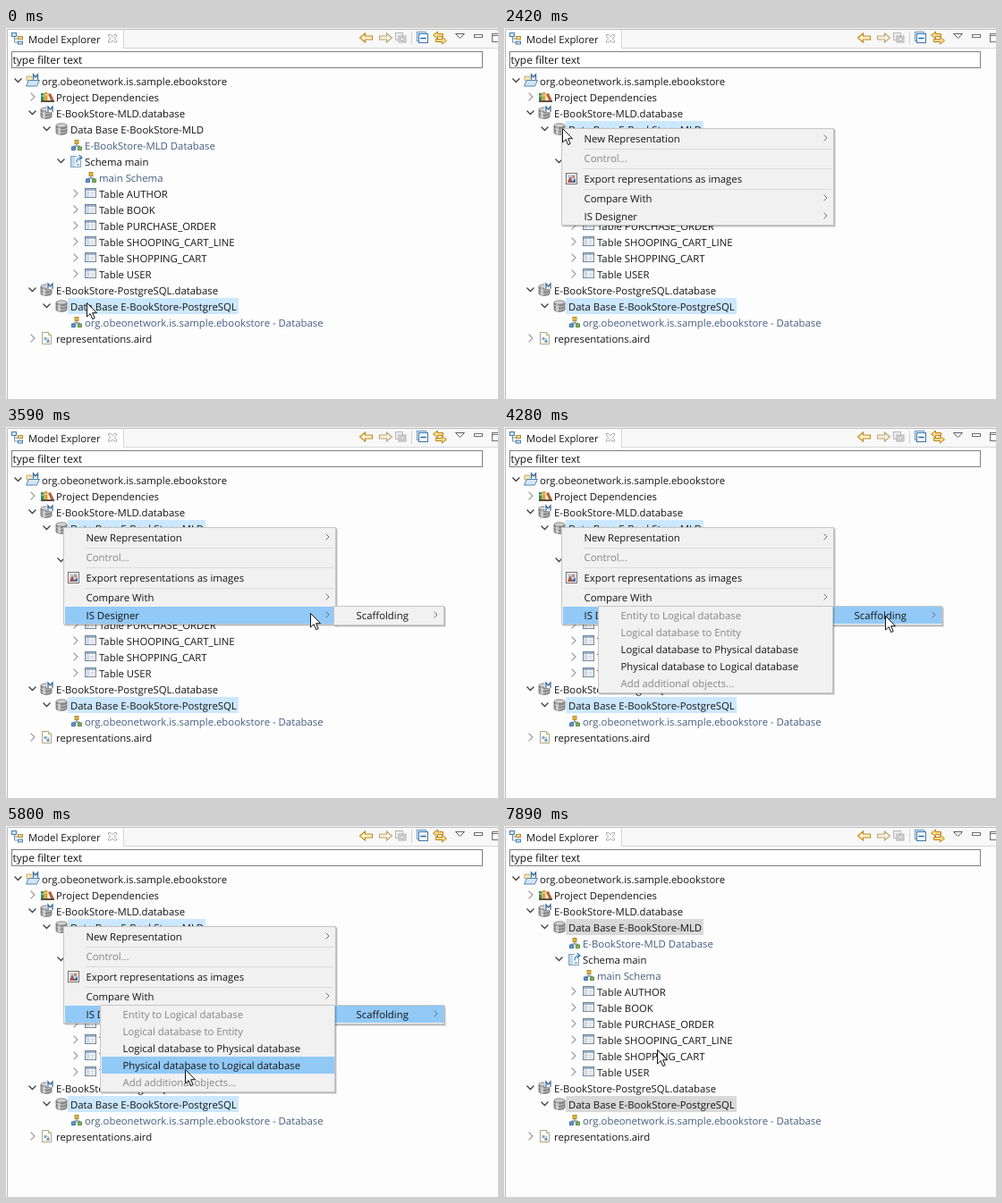
Recreate the animation shown at these times as an HTML page. Size 550 px wide and 415 px high, loop 8000 ms.

```html
<!DOCTYPE html>
<html lang="en">
<head>
<meta charset="utf-8">
<title>Model Explorer</title>
<style>
html, body { margin: 0; width: 100%; height: 100%; overflow: hidden; background: #fdfdfd; }
svg { display: block; width: 550px; height: 415px; }
text { font-family: "Open Sans", "Noto Sans", sans-serif; font-size: 11.35px; fill: #161616; text-rendering: geometricPrecision; white-space: pre; }
.line { fill: none; stroke-linecap: square; }
</style>
</head>
<body>
<svg id="stage" viewBox="0 0 550 415" xmlns="http://www.w3.org/2000/svg"></svg>
<script>
const LOOP = 8000;
const BLUE = '#cce8ff', HOVER = '#e5f3ff', GREY = '#d9d9d9', ACTIVE = '#91c9f7';
const stage = document.getElementById('stage');

const rect = (x, y, w, h, fill, more = '') => `<rect x="${x}" y="${y}" width="${w}" height="${h}" fill="${fill}" ${more}/>`;
const path = (d, fill, stroke = 'none', w = 1) => `<path d="${d}" fill="${fill}" stroke="${stroke}" stroke-width="${w}"/>`;
const label = (x, y, s, more = '') => `<text x="${x}" y="${y}" ${more}>${s}</text>`;
const group = (x, y, body, scale = '1 1') => `<g transform="translate(${x} ${y}) scale(${scale})">${body}</g>`;
const stroke = (d, color, w = 1) => `<path class="line" d="${d}" stroke="${color}" stroke-width="${w}"/>`;

// Icons: x starts at the left edge, y is centred on the row.
const badge = (x, y) => stroke(`M${x} ${y + 5}v-5l2.5 3 2.5 -3v5`, '#3a6a98', 1.3);
const drum = path('M0 -4v8c0 3 12 3 12 0v-8z', '#8a8a8a', '#6d6d6d', .8) +
  path('M2 -3v8.6c1 .4 2 .5 3 .5v-9z', '#c6c6c6') +
  '<ellipse cx="6" cy="-4" rx="6" ry="2.2" fill="#d2d2d2" stroke="#777" stroke-width=".8"/>' +
  stroke('M.5 -.5c1 2 10 2 11 0M.5 3c1 2 10 2 11 0', '#dedede', .7);
const icons = {
  folder: path('M1 -5h5l1 2h7v3h-13z', '#f7e8b8', '#b99a52', .8) +
    path('M.5 6l3 -6.5h12l-3 6.5z', '#d3e5f4', '#3f7db0', .9) +
    rect(7, -8, 8, 7, '#fdfdfd') + badge(8.5, -7),
  books: rect(0, -4, 3.5, 10, '#3b8a57') + rect(4, -5, 3.5, 11, '#e0a02c') +
    path('M8 -3l3 -1 4 9 -3 1z', '#bd5c36') + rect(0, 4, 15, 2, '#5b5040') +
    stroke('M1 -1h1.5M5 -2h1.5', '#fff', .8),
  model: drum + rect(6.5, -8, 8, 7, '#fdfdfd') + badge(8, -7),
  drum,
  diagram: stroke('M6 -1v2M2.5 3v-2h7v2', '#6d7d8e') +
    rect(4, -5.5, 4, 4, '#e6b93a', 'stroke="#a37b18" stroke-width=".8"') +
    rect(.5, 2, 4, 3.5, '#5d9bd1', 'stroke="#2d6394" stroke-width=".8"') +
    rect(7.5, 2, 4, 3.5, '#81b55a', 'stroke="#4b7f2d" stroke-width=".8"'),
  schema: rect(.5, -5.5, 11, 12, '#f5f9fd', 'stroke="#7fa3c4"') +
    rect(1, -5, 4, 11, '#c2d9ec') + rect(7, -8, 8, 7, '#fdfdfd') +
    stroke('M7 1c0 -4 2 -5 5 -5M10 -6.5l3 2.5 -3 2.5M7.5 4h2', '#2d78b6', 1.2),
  table: rect(.5, -5.5, 12, 10, '#f7f9fb', 'stroke="#6f8499" stroke-width="1"') +
    rect(1, -5, 11, 2, '#9fb4c8') + rect(1, -3, 3.5, 7, '#d5e0ea') +
    stroke('M1 -.5h11M1 2h11M4.5 -2v6M8.5 -2v6', '#cbd5de', .8),
  file: path('M.5 -6.5h7l3 3v10h-10z', '#fffef5', '#a99a72', .9) +
    path('M7.5 -6.5v3h3', '#eee3bd', '#b3a16c', .8) +
    rect(2.5, -1, 3, 3, '#7fabd0') + rect(5.5, 2, 3, 3, '#6f97bb') + stroke('M6.5 .5h1v1', '#7fabd0', .8)
};

// text x, label, icon, icon x, chevron x (0 = none), open, tinted
const rows = [
  [40, 'org.obeonetwork.is.sample.ebookstore', 'folder', 22, 13.5, 1],
  [56, 'Project Dependencies', 'books', 39, 30, 0],
  [56, 'E-BookStore-MLD.database', 'model', 39, 29.5, 1],
  [72, 'Data Base E-BookStore-MLD', 'drum', 56, 45.5, 1],
  [88, 'E-BookStore-MLD Database', 'diagram', 73, 0, 0, 1],
  [88, 'Schema main', 'schema', 72, 61.5, 1],
  [104, 'main Schema', 'diagram', 89, 0, 0, 1],
  ...['AUTHOR', 'BOOK', 'PURCHASE_ORDER', 'SHOOPING_CART_LINE', 'SHOPPING_CART', 'USER']
    .map(n => [104, 'Table ' + n, 'table', 88, 78, 0]),
  [56, 'E-BookStore-PostgreSQL.database', 'model', 39, 29.5, 1],
  [72, 'Data Base E-BookStore-PostgreSQL', 'drum', 56, 45.5, 1],
  [88, 'org.obeonetwork.is.sample.ebookstore - Database', 'diagram', 73, 0, 0, 1],
  [56, 'representations.aird', 'file', 40, 30, 0]
];
const MLD = 3, POSTGRES = 14;
const rowY = i => 59 + 18 * i;

function treeRow([x, s, icon, ix, cx, open, tint], i) {
  const y = rowY(i);
  const chevron = !cx ? '' : open
    ? stroke(`M${cx - 3.5} ${y - 2}l3.5 3.5 3.5 -3.5`, '#404040', 1.3)
    : stroke(`M${cx - 2} ${y - 4}l4 4 -4 4`, '#9c9c9c', 1.2);
  return rect(x - 3, y - 9, 10, 18, 'none', `id="row${i}"`) + chevron +
    group(ix, y, icons[icon]) + label(x, y + 5, s, `id="text${i}"` + (tint ? ' style="fill:#465f80"' : ''));
}

function toolbar() {
  const arrow = 'M.5 0l6 -5v3h8v4h-8v3z';
  return group(395, 11, path(arrow, '#fdf0cc', '#c28a1e', 1.1)) +
    group(432, 11, path(arrow, '#f7f0de', '#bba675', 1.1), '-1 1') +
    group(435, 11, rect(.5, -5.5, 8, 8, '#ededed', 'stroke="#b8b8b8"') +
      rect(4, -2, 8, 7, '#dcdcdc', 'stroke="#b0b0b0"') + '<circle cx="8" cy="1.5" r="2" fill="#f6f6f6" stroke="#a8a8a8"/>') +
    stroke('M453.5 4.5v14', '#d4d4d4') +
    group(459, 11, rect(.5, -6.5, 10, 10, '#d6e8f7', 'stroke="#6b9ac4"') +
      rect(2.5, -4.5, 10, 10, '#f5fafe', 'stroke="#3b76ab"') + stroke('M5 .5h5', '#225f9a', 1.4)) +
    group(477, 11, path('M.5 -3l5 -4v2.5h6v3h-6v2.5z', '#f8d98a', '#bf851b') +
      path('M15.5 3l-5 -4v2.5h-7v3h7v2.5z', '#f8d98a', '#bf851b')) +
    path('M502.5 6.5h10l-5 5z', '#fff', '#5f5f5f') +
    rect(523.5, 7.5, 9, 3, '#fff', 'stroke="#6d6d6d"') +
    rect(543.5, 6.5, 10, 9, '#fff', 'stroke="#6d6d6d"') + stroke('M544 8.5h9', '#6d6d6d');
}

function header() {
  return rect(0, 0, 550, 23, '#f8f8f8') + stroke('M1.5 415V1.5H550', '#b9b9b9') +
    rect(2, 2, 129, 21, '#fff') + stroke('M131.5 2V22.5H550', '#d6d6d6') +
    group(6, 12, stroke('M3.5 -2v6h4M3.5 0h4', '#7890a8') +
      rect(.5, -6.5, 5, 4, '#cfe3f4', 'stroke="#457eaf"') +
      rect(7.5, -2.5, 5, 3, '#f3dc98', 'stroke="#b48a30"') +
      rect(7.5, 3, 5, 3, '#cfe3f4', 'stroke="#457eaf"')) +
    label(25, 17, 'Model Explorer') +
    path('M114.5 7.5h2.5l2 2.3 2 -2.3h2.5v2l-2.5 2.2 2.5 2.2v2.1h-2.5l-2 -2.2 -2 2.2h-2.5v-2.1l2.5 -2.2 -2.5 -2.2z', '#fff', '#a2a2a2', .9) +
    toolbar() +
    rect(6.5, 26.5, 526, 18, '#fff', 'stroke="#7f7f7f"') +
    label(7.5, 40, 'type filter text', 'style="font-size:12px"');
}

const panel = (x, y, w, h) => rect(x + 2, y + 2, w, h, '#000', 'opacity=".1"') +
  rect(x + 1, y + 1, w, h, '#000', 'opacity=".18"') +
  rect(x + .5, y + .5, w - 1, h - 1, '#f1f1f1', 'stroke="#c6c6c6"');
const item = (id, x, w, tx, y, s, off, more) => rect(x, y - 10, w, 19, 'none', `id="${id}"`) +
  label(tx, y + 4, s, off ? 'style="fill:#858585"' : '') +
  (more ? stroke(`M${x + w - 10} ${y - 4}l3 3 -3 3`, '#707070') : '');

function mainMenu() {
  const list = [['New Representation', 124, 0, 1], ['Control...', 146, 1, 0],
    ['Export representations as images', 169, 0, 0], ['Compare With', 191, 0, 1], ['IS Designer', 211, 0, 1]];
  return panel(64, 112, 305, 109) +
    [135, 157, 180].map(y => stroke(`M89.5 ${y + .5}H366`, '#dcdcdc')).join('') +
    list.map(([s, y, off, more], i) => item('m' + i, 66, 302, 89.5, y, s, off, more)).join('') +
    group(69, 169, rect(.5, -6.5, 12, 12, '#fff', 'stroke="#7a6b64"') + rect(2, -5, 9, 9, '#bcd4e8') +
      path('M2 4l3 -7 3 7z', '#b0503e') + path('M6 4l5 -5v5z', '#4169a0') + rect(7, -4, 3, 3, '#d98b62'));
}

function convertMenu() {
  const list = [['Entity to Logical database', 1], ['Logical database to Entity', 1],
    ['Logical database to Physical database', 0], ['Physical database to Logical database', 0],
    ['Add additional objects...', 1]];
  return panel(105, 200, 263, 98) +
    list.map(([s, off], i) => item('c' + i, 107, 260, 130.5, 211 + 19 * i, s, off)).join('');
}

stage.innerHTML = rect(0, 0, 550, 415, '#fdfdfd') + header() + rows.map(treeRow).join('') +
  `<g id="main">${mainMenu()}</g>` +
  `<g id="scaffold">${panel(366, 200, 124, 22)}${item('s0', 368, 121, 391.5, 211, 'Scaffolding', 0, 1)}</g>` +
  `<g id="convert">${convertMenu()}</g>` +
  `<g id="cursor">${path('M.5 .5v15.5l3.6 -3.4 2.6 6 2.5 -1.1 -2.6 -5.8h4.9z', '#fff', '#111', 1)}</g>`;

const el = id => document.getElementById(id);
const fill = (id, color) => el(id).setAttribute('fill', color);
const show = (id, alpha) => el(id).setAttribute('opacity', alpha);
const widths = rows.map((r, i) => Math.round(el('text' + i).getComputedTextLength()) + 5);
widths.forEach((w, i) => el('row' + i).setAttribute('width', w));

// Pointer moves: start, time between steps, then the places it jumps to.
const moves = [
  [0, 0, [90, 307]],
  [400, 135, [92, 288], [99, 226], [107, 158], [111, 122], [112, 112]],
  [1220, 0, [111, 108]],
  [1470, 137, [109, 109], [98, 110], [84, 111], [70, 111], [64, 111]],
  [2420, 127, [65, 112], [73, 132], [86, 152], [93, 165], [100, 178], [114, 190], [130, 199], [142, 203], [149, 204]],
  [3590, 135, [340, 208], [398, 211], [426, 211]],
  [4810, 135, [415, 213], [385, 219], [345, 229], [305, 242], [267, 252]],
  [5500, 150, [235, 263], [210, 275], [200, 272]],
  [6420, 130, [193, 268], [184, 260], [176, 254], [171, 250]]
];
const steps = moves.flatMap(([t, gap, ...places]) => places.map((p, i) => [t + gap * i, p]));

function draw(t) {
  const [x, y] = steps.filter(s => s[0] <= t).pop()[1];
  const menu = t >= 2420 && t < 7620;
  const scaffold = menu && t >= 3440;
  const convert = menu && t >= 4130;
  el('cursor').setAttribute('transform', `translate(${x} ${y})`);

  const picked = t >= 7750 ? GREY : BLUE;
  rows.forEach((r, i) => {
    const over = t < 2420 && Math.abs(y - rowY(i)) < 9 && x >= r[0] - 3 && x < r[0] - 3 + widths[i];
    const chosen = i === POSTGRES || (i === MLD && t >= 1470);
    fill('row' + i, chosen ? picked : over ? HOVER : 'none');
  });

  show('main', menu ? 1 : 0);
  show('scaffold', scaffold ? 1 : 0);
  show('convert', !convert ? 0 : t < 4280 ? .6 : 1);
  [124, 146, 169, 191, 211].forEach((c, i) => {
    const on = scaffold ? i === 4 : menu && i !== 1 && y >= c - 10 && y < c + 9;
    fill('m' + i, on ? ACTIVE : 'none');
  });
  fill('s0', scaffold && t >= 3720 ? ACTIVE : 'none');
  for (let i = 0; i < 5; i++) {
    const on = convert && (i === 2 || i === 3) && x < 367 && y >= 201 + 19 * i && y < 220 + 19 * i;
    fill('c' + i, on ? ACTIVE : 'none');
  }
}

const start = performance.now();
function tick(now) {
  draw(Math.max(0, now - start) % LOOP);
  requestAnimationFrame(tick);
}
draw(0);
requestAnimationFrame(tick);
</script>
</body>
</html>
```
